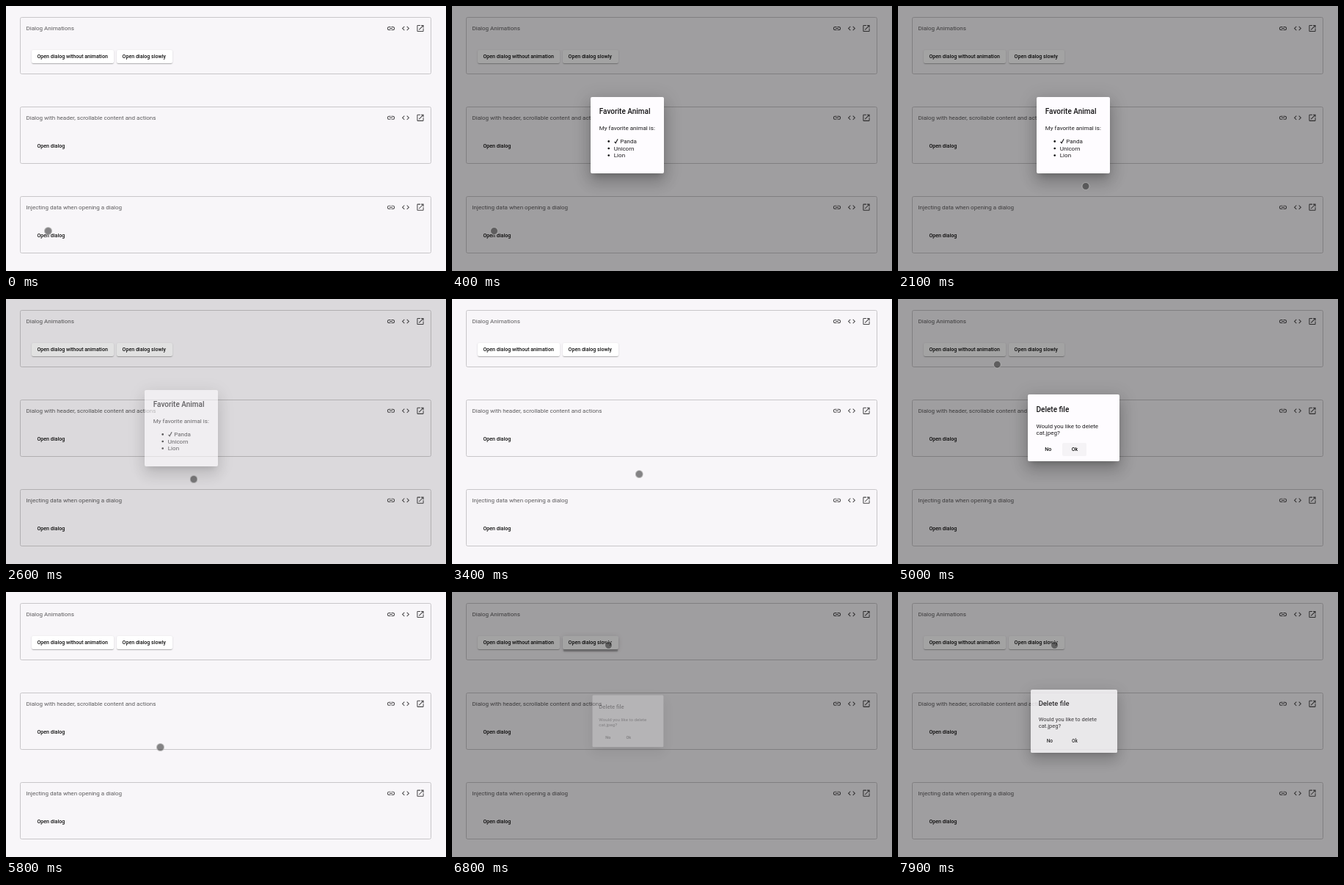
An HTML page that plays this animation: 600 px wide and 361 px high, repeating every 8000 ms.

```html
<!DOCTYPE html>
<html lang="en">
<head>
<meta charset="utf-8">
<title>Dialog demos</title>
<style>
  html, body { margin: 0; width: 100%; height: 100%; overflow: hidden; background: #f8f6f9; }
  #stage { position: absolute; left: 0; top: 0; width: 600px; height: 361px; overflow: hidden; background: #f8f6f9; }
  #stage div, #stage svg { position: absolute; }
  svg { left: 0; top: 0; overflow: visible; font-family: Roboto, Arial, sans-serif; }
  .panel { fill: none; stroke: #c8c6c9; }
  .label { font-size: 8.05px; fill: #5c5b5d; }
  .button { font-size: 7.05px; font-weight: 500; fill: #111; }
  .title { font-size: 10px; font-weight: 500; fill: #161517; }
  .body { font-size: 8.05px; fill: #1d1c1e; }
  .icon { fill: #49484a; }
  .raised {
    --lift: 1;
    top: 59.5px; height: 18px; border-radius: 2px; background: #fff;
    box-shadow: 0 calc(1.5px * var(--lift)) 1px -1px rgba(0,0,0,.2),
      0 calc(1px * var(--lift)) calc(1px * var(--lift)) rgba(0,0,0,.14),
      0 .5px calc(2.5px * var(--lift)) rgba(0,0,0,.12);
  }
  #backdrop { inset: 0; background: #000; }
  .dialog {
    border-radius: 2px; background: #fefcff;
    box-shadow: 0 5.5px 7.5px -3.5px rgba(0,0,0,.2),
      0 12px 19px 1.5px rgba(0,0,0,.14), 0 4.5px 23px 4px rgba(0,0,0,.12);
  }
  #focus { left: 47.5px; top: 66px; width: 33px; height: 18px; border-radius: 2px; background: #f5f3f6; }
  #cursor {
    left: -5.5px; top: -5.5px; width: 9px; height: 9px; border-radius: 50%;
    border: 1px solid rgba(255,255,255,.45); background: rgba(49,49,49,.58);
  }
</style>
</head>
<body>
<div id="stage">
  <div class="raised" id="instant" style="left:35px;width:111.5px"></div>
  <div class="raised" id="slow" style="left:151px;width:75.5px"></div>
  <svg id="page" width="600" height="361"></svg>
  <div id="backdrop"></div>
  <div class="dialog" id="animal" style="left:189px;top:123.5px;width:100px;height:104.5px">
    <svg width="100" height="104">
      <text class="title" x="11.8" y="23.3">Favorite Animal</text>
      <text class="body" x="11.8" y="45.5">My favorite animal is:</text>
      <circle cx="24.7" cy="60.4" r="1.3"/>
      <circle cx="24.7" cy="70" r="1.3"/>
      <circle cx="24.7" cy="79.5" r="1.3"/>
      <path d="M32.6 60.8l1.5 2 3-5.6" fill="none" stroke="#161517" stroke-width="1.1"/>
      <text class="body" x="40.2" y="63.2">Panda</text>
      <text class="body" x="31.8" y="72.8">Unicorn</text>
      <text class="body" x="31.8" y="82.2">Lion</text>
    </svg>
  </div>
  <div class="dialog" id="remove" style="left:176.5px;top:129.5px;width:125.5px;height:91.5px">
    <div id="focus"></div>
    <svg width="125" height="91">
      <text class="title" x="11.5" y="23.8">Delete file</text>
      <text class="body" x="11.5" y="46">Would you like to delete</text>
      <text class="body" x="11.5" y="55.3">cat.jpeg?</text>
      <text class="button" x="27.7" y="77.3" text-anchor="middle">No</text>
      <text class="button" x="64" y="77.3" text-anchor="middle">Ok</text>
    </svg>
  </div>
  <div id="cursor"></div>
</div>
<script>
const LOOP = 8000, STEP = 100, SHADE = 0.36;
const $ = id => document.getElementById(id);
const clamp = v => Math.min(1, Math.max(0, v));
const mix = (a, b, p) => a + (b - a) * p;
const span = (t, start, length) => clamp((t - start) / length);
const smooth = p => p * p * (3 - 2 * p);

function bezier(x1, y1, x2, y2) {
  const at = (a, b, s) => 3 * (1 - s) * (1 - s) * s * a + 3 * (1 - s) * s * s * b + s * s * s;
  return x => {
    if (x <= 0 || x >= 1) return clamp(x);
    let lo = 0, hi = 1;
    for (let i = 0; i < 24; i++) {
      const mid = (lo + hi) / 2;
      if (at(x1, x2, mid) < x) lo = mid; else hi = mid;
    }
    return at(y1, y2, lo);
  };
}
const fade = bezier(0.25, 0.8, 0.25, 1);
const enter = bezier(0, 0, 0.2, 1);

const ICONS = [
  [525, "M3.9 12c0-1.7 1.4-3.1 3.1-3.1h4V7H7a5 5 0 0 0 0 10h4v-1.9H7A3.1 3.1 0 0 1 3.9 12zM8 13h8v-2H8zM17 7h-4v1.9h4a3.1 3.1 0 0 1 0 6.2h-4V17h4a5 5 0 0 0 0-10z"],
  [545, "M9.4 16.6L4.8 12l4.6-4.6L8 6l-6 6 6 6zM14.6 16.6l4.6-4.6-4.6-4.6L16 6l6 6-6 6z"],
  [565, "M19 19H5V5h7V3H5a2 2 0 0 0-2 2v14a2 2 0 0 0 2 2h14a2 2 0 0 0 2-2v-7h-2zM14 3v2h3.6l-9.8 9.8 1.4 1.4L19 6.4V10h2V3z"]
];
const PANELS = [
  [15.5, "Dialog Animations", [[42.5, "Open dialog without animation"], [158.6, "Open dialog slowly"]]],
  [137.3, "Dialog with header, scrollable content and actions", [[42.5, "Open dialog"]]],
  [259.2, "Injecting data when opening a dialog", [[42.5, "Open dialog"]]]
];
$("page").innerHTML = PANELS.map(([y, label, buttons]) =>
  `<rect class="panel" x="19.5" y="${Math.floor(y) + 0.5}" width="560" height="77" rx="2"/>` +
  `<text class="label" x="27.4" y="${y + 17.6}">${label}</text>` +
  buttons.map(([x, s]) => `<text class="button" x="${x}" y="${y + 55.5}">${s}</text>`).join("") +
  ICONS.map(([x, d]) =>
    `<path class="icon" transform="translate(${x} ${y + 15}) scale(.51) translate(-12 -12)" d="${d}"/>`).join("")
).join("");

// Pointer moves: start, end, target, and the bend of the path
const START = [57, 306];
const MOVES = [
  [1300, 2100, 255.5, 245, 156, 280],
  [3300, 4100, 128, 74, 250, 165],
  [4900, 5400, 205, 205, 160, 145],
  [5600, 5800, 210, 211, 207, 208],
  [5900, 6500, 213, 72, 212, 140]
];
function pointer(t) {
  let [x, y] = START;
  for (const [from, to, tx, ty, bx, by] of MOVES) {
    const p = smooth(span(t, from, to - from));
    x = mix(mix(x, bx, p), mix(bx, tx, p), p);
    y = mix(mix(y, by, p), mix(by, ty, p), p);
  }
  return [x, y];
}

// Backdrop: opening and closing times
const SHADES = [[50, 2570], [4152, 5570], [6460, LOOP + 500]];
const shade = t => SHADES.reduce((sum, [open, close]) =>
  sum + fade(span(t, open, 400)) - fade(span(t, close, 130)), 0);

function show(el, grow, opacity) {
  el.style.opacity = opacity;
  el.style.transform = `scale(${mix(0.7, 1, grow)})`;
}

function draw(t) {
  const [x, y] = pointer(t);
  $("cursor").style.transform = `translate(${x}px,${y}px)`;
  $("backdrop").style.opacity = SHADE * shade(t);

  const pop = enter(span(t, 50, 150));
  show($("animal"), pop, pop * (1 - span(t, 2570, 75)));

  const instant = t >= 4152 && t < 5570;
  const grow = instant ? 1 : enter(span(t, 6590, 3000));
  show($("remove"), grow, grow);
  $("focus").style.opacity = instant ? 1 : 0;

  const press = span(t, 4050, 100) * (1 - span(t, 4200, 200));
  $("instant").style.background = `rgb(${Array(3).fill(255 * (1 - 0.12 * press))})`;
  $("instant").style.setProperty("--lift", 1 + press * 0.5);
  const lift = span(t, 6400, 100) * (1 - span(t, 6800, 300));
  $("slow").style.setProperty("--lift", 1 + lift * 1.8);
}

function tick() {
  draw(Math.floor(performance.now() % LOOP / STEP) * STEP);
  requestAnimationFrame(tick);
}
tick();
</script>
</body>
</html>
```
